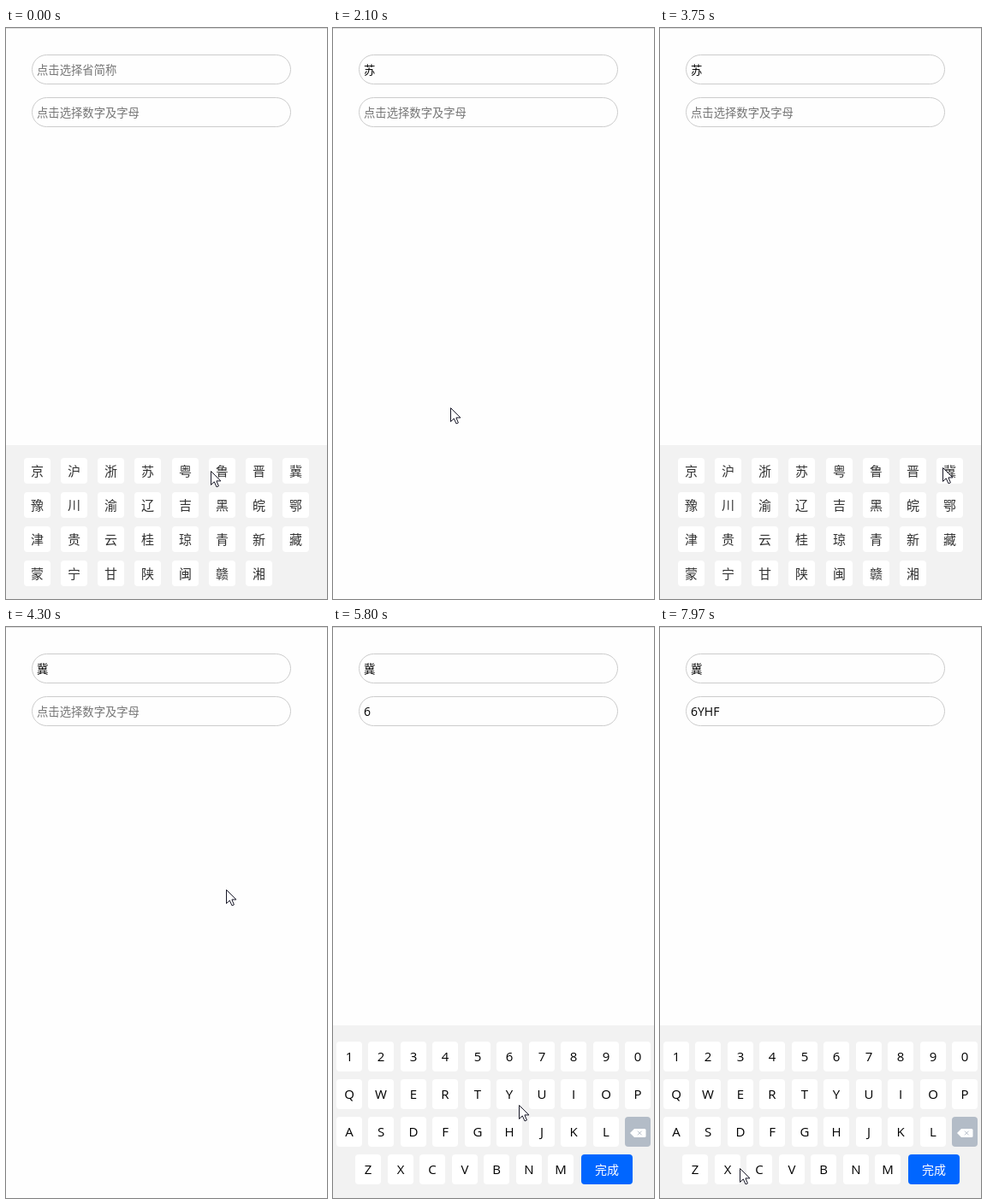
Animation, 375 px wide and 668 px high, one loop 8 s. Source, as an HTML page:

```html
<!DOCTYPE html>
<html lang="zh-CN">
<head>
<meta charset="utf-8">
<title>车牌键盘</title>
<style>
  html, body { margin: 0; width: 100%; height: 100%; overflow: hidden; background: #fefefe; }
  body { position: relative; font-family: "Noto Sans CJK SC", "Noto Sans CJK", sans-serif; }
  div, svg { position: absolute; box-sizing: border-box; }
  #stage { left: 0; top: 0; width: 375px; height: 668px; overflow: hidden; border-top: 1px solid #ddd; }
  .field {
    left: 30px; width: 303px; height: 35px; padding-left: 5px;
    border: 1px solid #ccc; border-radius: 18px;
    font-size: 13.333px; line-height: 33px; color: #000; white-space: nowrap;
  }
  .field.latin { font-family: "Open Sans", sans-serif; font-size: 14px; }
  .field.empty { color: #757575; }
  .panel { left: 0; width: 375px; bottom: 0; background: #f2f2f2; }
  .key { border-radius: 4px; background: #fff; text-align: center; }
  #provinces .key { width: 31px; height: 30px; font-size: 15px; line-height: 29px; color: #333; }
  #letters .key {
    width: 30px; height: 35px; line-height: 34px; color: #000;
    font-family: "Open Sans", sans-serif; font-size: 15px;
  }
  #letters .done {
    width: 60px; background: #06f; color: #fff; font-size: 14px;
    font-family: "Noto Sans CJK SC", "Noto Sans CJK", sans-serif;
  }
  #letters .erase { background: #b3bcc7; }
  .erase svg { left: 5px; top: 13px; }
  #cursor { left: 0; top: -1px; overflow: visible; }
</style>
</head>
<body>
<div id="stage">
  <div class="field" id="province" style="top:30px"></div>
  <div class="field" id="number" style="top:80px"></div>
  <div class="panel" id="provinces" style="height:180px"></div>
  <div class="panel" id="letters" style="height:202px"></div>
  <svg id="cursor" width="13" height="20">
    <path d="M.5 .5V16.5L4.3 12.9L7 18.9L9.4 17.9L6.9 11.9H12Z" fill="#fff" stroke="#181828"/>
  </svg>
</div>
<script>
const LOOP = 8000;
const byId = id => document.getElementById(id);
const province = byId('province'), number = byId('number'), cursor = byId('cursor');
const panels = { provinces: byId('provinces'), letters: byId('letters') };

function addKey(panel, x, y, label, type = '') {
  const key = document.createElement('div');
  key.className = 'key ' + type;
  key.style.left = Math.round(x) + 'px';
  key.style.top = y + 'px';
  key.textContent = label;
  panel.append(key);
  return key;
}

function addRow(panel, labels, x, y, pitch) {
  [...labels].forEach((label, i) => addKey(panel, x + i * pitch, y, label));
}

['京沪浙苏粤鲁晋冀', '豫川渝辽吉黑皖鄂', '津贵云桂琼青新藏', '蒙宁甘陕闽赣湘']
  .forEach((row, i) => addRow(panels.provinces, row, 21, 15 + 40 * i, 43.15));
['1234567890', 'QWERTYUIOP', 'ASDFGHJKL']
  .forEach((row, i) => addRow(panels.letters, row, 3.8, 19 + 44 * i, 37.5));
addRow(panels.letters, 'ZXCVBNM', 26.3, 151, 37.5);
addKey(panels.letters, 290, 151, '完成', 'done');
addKey(panels.letters, 341, 107, '', 'erase').innerHTML =
  '<svg width="20" height="12"><path d="M1 6L6 1H18Q19.5 1 19.5 2.5V9.5Q19.5 11 18 11H6Z" fill="#fff"/>' +
  '<path d="M10 3.7L14.6 8.3M14.6 3.7L10 8.3" stroke="#b3bcc7"/></svg>';

// Each stroke goes from the last stop to `to` in eased steps, bowed sideways by `bow`.
const home = [239, 518];
const strokes = [
  { start: 120, end: 780, steps: 6, to: [159, 517], bow: [0, 18] },
  { start: 1860, end: 2790, steps: 8, to: [130, 49], bow: [-25, 0] },
  { start: 3075, end: 3750, steps: 6, to: [330, 514] },
  { start: 4140, end: 4560, steps: 4, to: [183, 99] },
  { start: 4700, end: 4840, steps: 2, to: [186, 378] },
  { start: 4990, end: 5110, steps: 2, to: [207, 503] },
  { start: 5250, end: 6070, steps: 7, to: [209, 547], bow: [11, 26] },
  { start: 6700, end: 6700, steps: 1, to: [208, 603] },
  { start: 7135, end: 7540, steps: 4, to: [147, 601] },
  { start: 7820, end: 7970, steps: 2, to: [93, 633] }
];

function pointerAt(t) {
  const index = strokes.findLastIndex(stroke => stroke.start <= t);
  if (index < 0) return home;
  const { start, end, steps, to, bow = [0, 0] } = strokes[index];
  const from = index ? strokes[index - 1].to : home;
  const gap = (end - start) / (steps - 1) || 1;
  const p = Math.min(1, (Math.floor((t - start) / gap + 0.01) + 1) / steps);
  const eased = p * p * (3 - 2 * p);
  return to.map((goal, axis) =>
    Math.round(from[axis] + (goal - from[axis]) * eased + bow[axis] * Math.sin(Math.PI * p)));
}

const typed = (text, times, t) => text.slice(0, times.filter(time => time <= t).length);

function openPanel(t) {
  if (t < 1180 || (t >= 2940 && t < 4000)) return 'provinces';
  return t >= 4700 ? 'letters' : '';
}

function fill(field, text, hint) {
  field.classList.toggle('empty', !text);
  if (field.textContent !== (text || hint)) field.textContent = text || hint;
}

function draw(t) {
  const digits = typed('6YHF', [5390, 6460, 7000, 7540], t);
  fill(province, typed('苏冀', [1180, 4000], t).slice(-1), '点击选择省简称');
  fill(number, digits, '点击选择数字及字母');
  number.classList.toggle('latin', !!digits);
  const open = openPanel(t);
  for (const name in panels) panels[name].style.visibility = name === open ? 'visible' : 'hidden';
  const [x, y] = pointerAt(t);
  cursor.style.transform = `translate(${x}px, ${y}px)`;
}

const begin = performance.now();
function tick() {
  draw((performance.now() - begin) % LOOP);
  requestAnimationFrame(tick);
}
tick();
</script>
</body>
</html>
```
